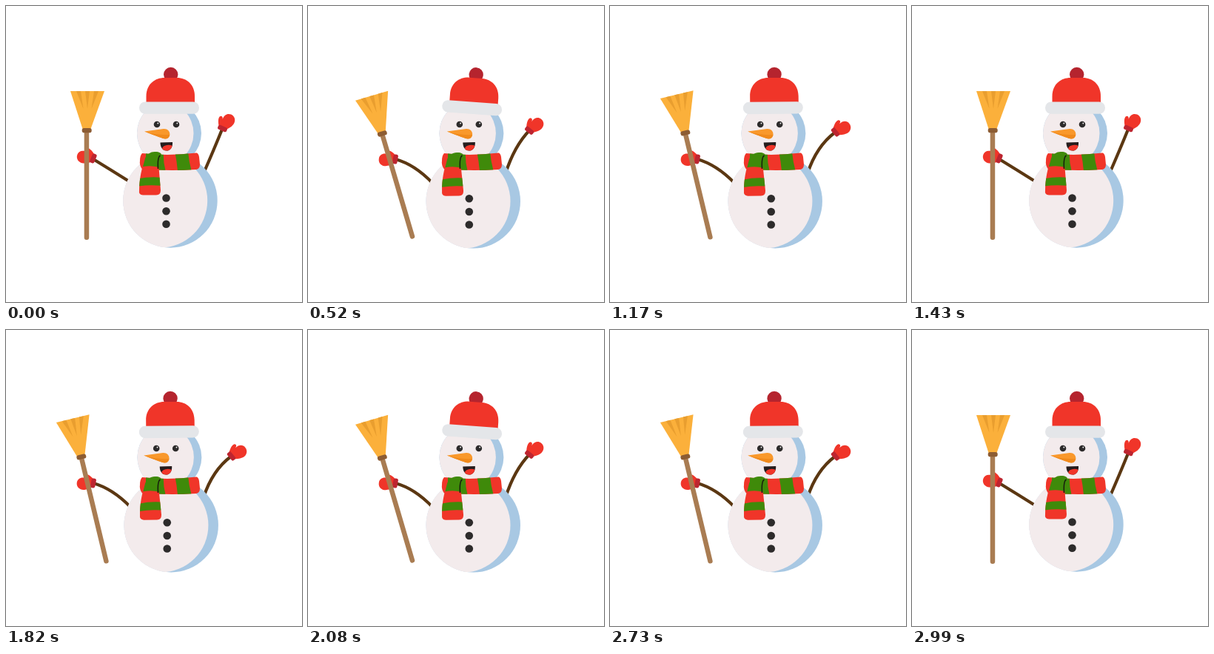
An HTML page for the animation above (3120 ms loop, 400 by 400 pixels).

```html
<!DOCTYPE html>
<html lang="en">
<head>
<meta charset="utf-8">
<title>Waving snowman</title>
<style>
  html, body { margin: 0; width: 100%; height: 100%; overflow: hidden; background: #fff; }
  svg { display: block; width: 100%; height: 100%; }
  .arm { fill: none; stroke: #5b3712; stroke-width: 4.2; }
  .red { fill: #f03529; }
  .green { fill: #3f8a0a; }
  .dark { fill: #2d2b2b; }
  .snow { fill: #f3ebec; }
  .shade { fill: #a8c8e3; }
</style>
</head>
<body>
<svg viewBox="0 0 400 400">
  <defs>
    <clipPath id="bodyClip"><circle cx="222" cy="263" r="63.7"/></clipPath>
    <clipPath id="headClip"><circle cx="220.5" cy="172" r="43.5"/></clipPath>
    <clipPath id="mouthClip"><path id="mouthShape" d="M208.5 184.5L225 184C225.5 191 222 195.6 217 195.6C211 195.6 208.5 190 208.5 184.5Z"/></clipPath>
    <clipPath id="bandClip"><path id="bandShape" d="M184 199Q220 203 257 198.5Q260 198.5 261 204L262 214Q262 220 257 221Q220 223 184 220.5Q180 215 181 209Q181 202 184 199Z"/></clipPath>
    <clipPath id="tailClip"><path id="tailShape" d="M189 206Q204 203 206 212L209 249Q209 255.5 203 255.5H185Q179 255 180 249C180 236 183 217 189 206Z"/></clipPath>
    <g id="mitten">
      <path class="red" d="M-5 0C-8 -4 -11 -9 -10 -13C-8.5 -16 -5.5 -14.5 -5 -11.5C-5.5 -18 -2 -22 3 -22C10 -22 13 -15 11 -10C10 -6 7 -3 5 0Z"/>
      <rect x="-6.5" y="-3.2" width="13" height="6.4" rx="2.6" fill="#bd2530"/>
    </g>
  </defs>

  <path id="leftArm" class="arm"/>
  <path id="rightArm" class="arm"/>
  <use id="leftMitten" href="#mitten"/>
  <use id="rightMitten" href="#mitten"/>

  <g id="broom">
    <rect x="105.7" y="168" width="6.5" height="148" rx="3" fill="#a97c52"/>
    <path d="M87 115H133L114.500 166H103.500Z" fill="#fbb03b"/>
    <path d="M95 115H101L104.500 139ZM107 115H113L110 139ZM119 115H125L115.500 139Z" fill="#e99e2f"/>
    <rect x="102.700" y="165" width="13" height="6.200" rx="2.800" fill="#8c5c33"/>
  </g>

  <g id="body">
    <circle class="shade" cx="222" cy="263" r="63.7"/>
    <circle class="snow" cx="208.500" cy="263" r="63.7" clip-path="url(#bodyClip)"/>
    <path class="snow" clip-path="url(#bodyClip)" d="M158 199H215V327H158Z"/>
    <g class="dark">
      <circle cx="216.500" cy="259.500" r="5.300"/>
      <circle cx="216.500" cy="277.200" r="5.300"/>
      <circle cx="216.500" cy="294.700" r="5.300"/>
    </g>
  </g>

  <g id="head">
    <circle class="shade" cx="220.500" cy="172" r="43.500"/>
    <path class="snow" clip-path="url(#headClip)" d="M176 128H209.500A43.500 43.500 0 0 1 209.500 216H176Z"/>
  </g>
  <g id="face">
    <circle class="dark" cx="204" cy="160" r="4.300"/>
    <circle class="dark" cx="230" cy="160" r="4.300"/>
    <circle cx="205.300" cy="158.500" r=".9" fill="#fff"/>
    <circle cx="231.300" cy="158.500" r=".9" fill="#fff"/>
    <path d="M187 169.500L213 166C223.500 165.500 224 179.500 215 179.500Q212 179.500 187 169.500Z" fill="#f9982b"/>
    <path d="M187 169.500Q204 175 221.300 174Q220 179.500 215 179.500Q212 179.500 187 169.500Z" fill="#f08a1c"/>
    <use href="#mouthShape" fill="#251d1d"/>
    <ellipse class="red" cx="219.500" cy="193" rx="8.500" ry="5.300" clip-path="url(#mouthClip)"/>
  </g>

  <g id="scarf">
    <use href="#bandShape" class="red"/>
    <path class="green" clip-path="url(#bandClip)" d="M189 196H213Q212 210 216 224H189ZM228 196H246Q247 210 251 224H232Q231 210 228 196Z"/>
    <g id="tail">
      <use href="#tailShape" class="red"/>
      <path class="green" clip-path="url(#tailClip)" d="M176 234Q193 230 212 232V243Q193 241 176 244Z"/>
      <path class="green" d="M188 206C190 200 196 196.500 202 197C207 197 210 199 210 201L207 218Q196 215 185 217Z"/>
    </g>
    <path d="M208.500 202Q204.500 204 205.500 220" fill="none" stroke="#171c0d" stroke-width="1.500"/>
  </g>

  <g id="hat">
    <circle cx="222.700" cy="92.500" r="9.700" fill="#b5242e"/>
    <path class="red" d="M189.500 133V122C189.500 105 202 97 214 97H231C244 97 255 106 255 122V133Z"/>
    <rect x="180" y="129.500" width="81" height="16.300" rx="8" fill="#e4e6e9"/>
  </g>
</svg>

<script>
const STEP = 130;
const LAST_POSE = 5;
const hatTilt = [0, -0.4, -0.6, 1.8, 4.2, 5];
const faceShift = [0, -0.5, -0.8, 0, 0.8, 1];

const sinDeg = degrees => Math.sin(degrees * Math.PI / 180);
const mix = (from, to, amount) => from + (to - from) * amount;
const set = (id, name, value) => document.getElementById(id).setAttribute(name, value);
const transform = (id, value) => set(id, "transform", value);

function pose(k) {
  const sway = sinDeg(26.3 * k);
  const wave = 1.04 * sinDeg(37 * k);
  const bend = Math.min(1, 1.2 * sway);

  transform("broom", `translate(${1.6 * sway} ${3 * sway}) rotate(${-17 * sway} 109 205)`);
  transform("body", `translate(${1.3 * bend} ${0.8 * bend})`);
  transform("head", `translate(${0.4 * bend} 0)`);
  transform("face", `translate(${faceShift[k]} 0)`);
  transform("tail", `translate(0 ${bend}) rotate(${-1.3 * bend} 200 202)`);
  transform("hat", `translate(${hatTilt[k] * 0.24} 0) rotate(${hatTilt[k]} 220 140)`);

  const handX = mix(292.5, 304.5, wave);
  const handY = mix(165.5, 170.5, wave);
  set("rightArm", "d", `M267 226Q${281 - 2 * bend} ${194 - 5 * bend} ${handX} ${handY}`);
  transform("rightMitten", `translate(${handX} ${handY}) rotate(${mix(24, 50, wave)})`);

  set("leftArm", "d", `M168 ${238 + bend}Q${142.5 + 1.5 * bend} ${222 - 8 * bend} 118 207`);
  transform("leftMitten", `translate(118 ${206 + bend}) rotate(${-68 - 12 * bend}) scale(-1 1)`);
}

// Poses run forward then back, with both end poses held twice as long.
function draw(now) {
  const slot = Math.floor(now / STEP) % (2 * LAST_POSE + 2);
  pose(slot <= LAST_POSE ? slot : 2 * LAST_POSE + 1 - slot);
}

const start = performance.now();
function tick() {
  draw(performance.now() - start);
  requestAnimationFrame(tick);
}
tick();
</script>
</body>
</html>
```
